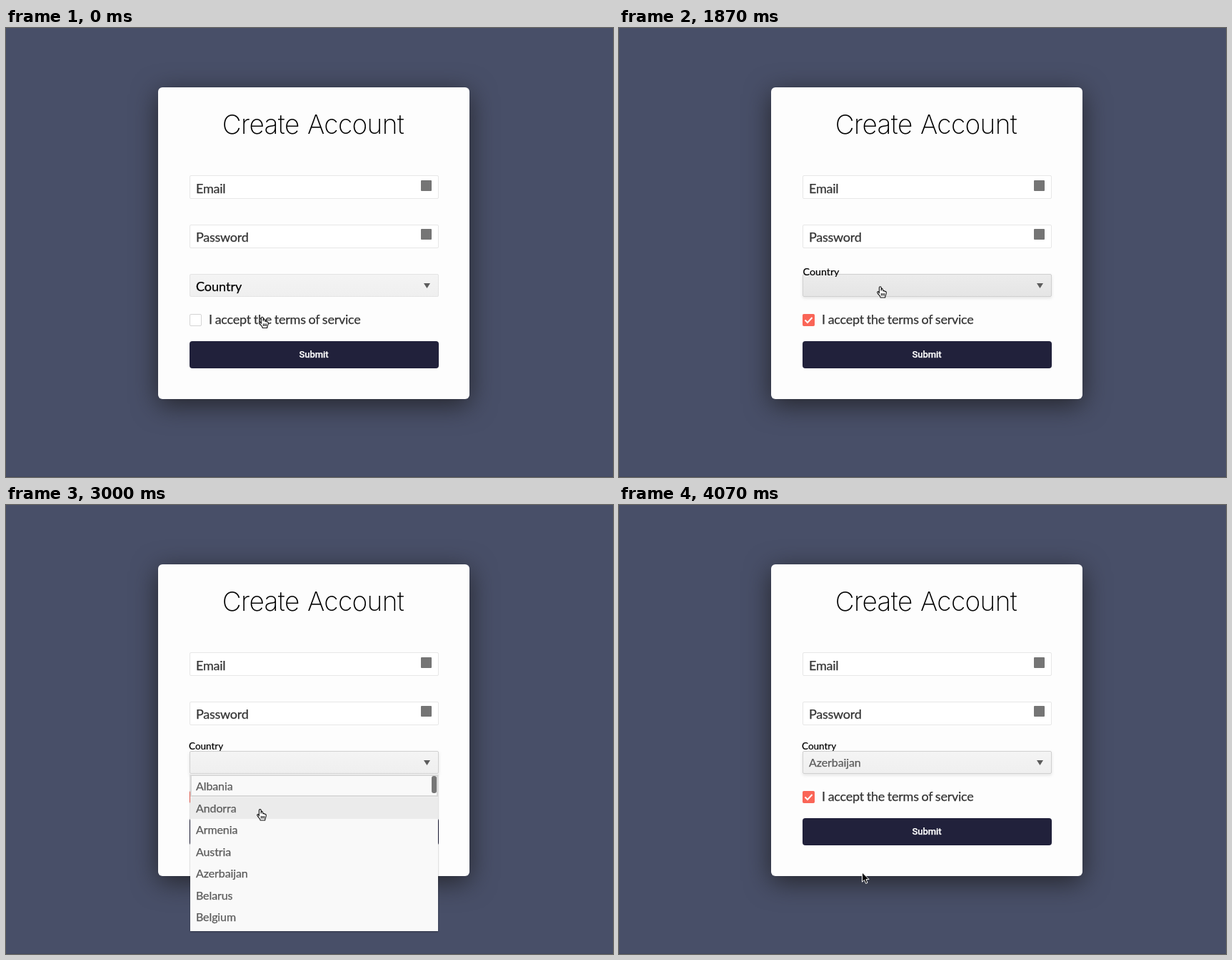
An HTML page for the animation above (4.19 s loop, 850 px wide and 628 px high).

```html
<!DOCTYPE html>
<html lang="en">
<head>
<meta charset="utf-8">
<title>Create Account</title>
<style>
  html, body { margin: 0; height: 100%; overflow: hidden; background: #484f68; }
  svg { display: block; }
  text { font: 18px Lato, sans-serif; fill: #333; stroke: #333; stroke-width: .25px; letter-spacing: -.25px; word-spacing: -.5px; }
  .title { font: 150 37px Inter, sans-serif; fill: #000; stroke: none; text-anchor: middle; letter-spacing: -.6px; word-spacing: 1.5px; }
  .submit { font: 500 13px Roboto, sans-serif; fill: #fff; stroke: #fff; text-anchor: middle; letter-spacing: -.1px; }
  .small { font-size: 16px; fill: #5b5b5b; stroke: #5b5b5b; letter-spacing: -.1px; }
  .field { fill: #fff; stroke: #e7e7e7; }
  #label { fill: #000; stroke: #000; letter-spacing: 0; }
  #card { filter: drop-shadow(0 8px 18px #24252b); }
  #list.open { filter: drop-shadow(0 1px 1px rgba(0, 0, 0, .3)); }
  #shadow { filter: drop-shadow(0 2px 2px rgba(0, 0, 0, .1)); }
</style>
</head>
<body>
<svg width="850" height="628" viewBox="0 0 850 628">
  <defs>
    <linearGradient id="normal" x2="0" y2="1">
      <stop stop-color="#f4f4f4"/><stop offset="1" stop-color="#efefef"/>
    </linearGradient>
    <linearGradient id="hover" x2="0" y2="1">
      <stop stop-color="#ececec"/><stop offset="1" stop-color="#e5e5e5"/>
    </linearGradient>
    <clipPath id="below"><rect x="250" y="376" width="365" height="250"/></clipPath>
  </defs>

  <rect y="627" width="850" height="1" fill="#434960"/>
  <rect id="card" x="213" y="83" width="436" height="436" rx="6" fill="#fdfdfd"/>
  <text class="title" x="430" y="148">Create Account</text>

  <rect class="field" x="257.5" y="206.5" width="348" height="32" rx="1.5"/>
  <text x="266" y="231">Email</text>
  <rect x="581" y="213" width="15" height="15" rx="1" fill="#757575"/>

  <rect class="field" x="257.5" y="275.5" width="348" height="32" rx="1.5"/>
  <text x="266" y="299">Password</text>
  <rect x="581" y="281" width="15" height="15" rx="1" fill="#757575"/>

  <rect x="257.5" y="400.5" width="16" height="16" rx="1.5" fill="#fff" stroke="#d4d4d4"/>
  <g id="check">
    <rect x="257" y="400" width="17" height="17" rx="2" fill="#fa6557"/>
    <path d="M260.5 408.5l3.5 3.5 6.5-7" fill="none" stroke="#fff" stroke-width="2"/>
  </g>
  <text x="284" y="414">I accept the terms of service</text>

  <rect x="257" y="438" width="349" height="38" rx="4" fill="#21213b"/>
  <text class="submit" x="431" y="461">Submit</text>

  <rect id="shadow" x="257" y="344" width="349" height="32" rx="2" fill="#fff"/>
  <g clip-path="url(#below)">
    <g id="list">
      <rect x="258" y="376" width="347" height="220" fill="#f9f9f9"/>
      <rect id="row" x="258" width="347" height="30.5" fill="#ebebeb"/>
      <rect x="259" y="378" width="345" height="29" fill="none" stroke="#d9d9d9" stroke-width="2"/>
      <rect x="596" y="379" width="7" height="24" rx="3" fill="#777"/>
    </g>
  </g>

  <rect id="box" x="257.5" y="344.5" width="348" height="31" rx="1.5"/>
  <path d="M585 357h9l-4.5 7z" fill="#5c5c5c"/>
  <text id="value" class="small" x="266" y="366">Azerbaijan</text>
  <text id="label">Country</text>

  <g id="cursor" stroke-linejoin="round">
    <path id="hand" d="M3.4 10V2.2C3.4.2 6.2.2 6.2 2.2V6.2C7-.1 8.8 5.6 9 7c.8-1 2-.6 2.2.6 1-.6 2.1 0 2.1 1.2 0 3-1.6 4-1.6 7.2H5.2C5 13.6 2.2 12.2.9 9.4.2 7.8 1.9 7.1 2.7 8.4zM6.4 10v3.6m2-3.6v3.6m2-3.6v3.6"
      fill="#fff" stroke="#111" stroke-width="1.1"/>
    <path id="arrow" d="M3.5 0v13.2l3-2.8 2.1 5 2.4-1-2.1-4.8h4.2z" fill="#000" stroke="#fff"/>
  </g>
</svg>
<script>
const LOOP = 4190, FRAME = 1000 / 15, ROW = 30.5, LIST_HEIGHT = 220;
const countries = ["Albania", "Andorra", "Armenia", "Austria", "Azerbaijan", "Belarus", "Belgium"];
const el = id => document.getElementById(id);
const progress = (t, start, end) => Math.min(1, Math.max(0, (t - start) / (end - start)));
const easeOut = x => 1 - (1 - x) ** 2;
const smooth = x => x * x * (3 - 2 * x);
const mix = (a, b, x) => a + (b - a) * x;
const show = (id, on) => el(id).setAttribute("visibility", on ? "visible" : "hidden");
const move = (id, x, y, scale = 1) =>
  el(id).setAttribute("transform", `translate(${x} ${y}) scale(${scale})`);

countries.forEach((name, i) => {
  el("list").insertAdjacentHTML("beforeend",
    `<text class="small" x="266" y="${399 + i * ROW}">${name}</text>`);
});

function draw(t) {
  const toSelect = smooth(progress(t, 930, 1265));
  const toItem = smooth(progress(t, 2733, 3333));
  const cursorX = mix(mix(354, 361, toSelect), 337, toItem);
  const cursorY = mix(mix(403.5, 361, toSelect), 514, toItem);
  move("cursor", cursorX, cursorY);
  show("hand", t < 3865);
  show("arrow", t >= 3865);

  el("check").setAttribute("opacity", progress(t, 400, 530));

  const hovered = cursorY > 344 && cursorY < 376;
  const focused = t >= 1730;
  const chosen = t >= 3650;
  el("box").setAttribute("fill", `url(#${hovered ? "hover" : "normal"})`);
  el("box").setAttribute("stroke", hovered || focused ? "#d0d0d0" : "#e4e4e4");
  show("shadow", focused);
  show("value", chosen);

  const float = smooth(progress(t, 1680, 1930));
  move("label", mix(266, 256, float), mix(368, 342, float), mix(1, .75, float));

  const opened = easeOut(progress(t, 1953.5, 2153)) - easeOut(progress(t, 3650, 3770));
  show("list", opened > 0);
  el("list").classList.toggle("open", opened === 1);
  move("list", 0, Math.round((opened - 1) * LIST_HEIGHT - .4));

  const row = chosen ? 4 : Math.floor((cursorY - 378) / ROW);
  el("row").setAttribute("y", 378 + row * ROW);
  el("row").setAttribute("opacity", chosen || (toItem > 0 && row >= 0) ? 1 : 0);
}

// The motion advances in steps of a fifteenth of a second.
function tick() {
  const t = performance.now() % LOOP;
  draw(Math.floor((t + 4) / FRAME) * FRAME);
  requestAnimationFrame(tick);
}
tick();
</script>
</body>
</html>
```
